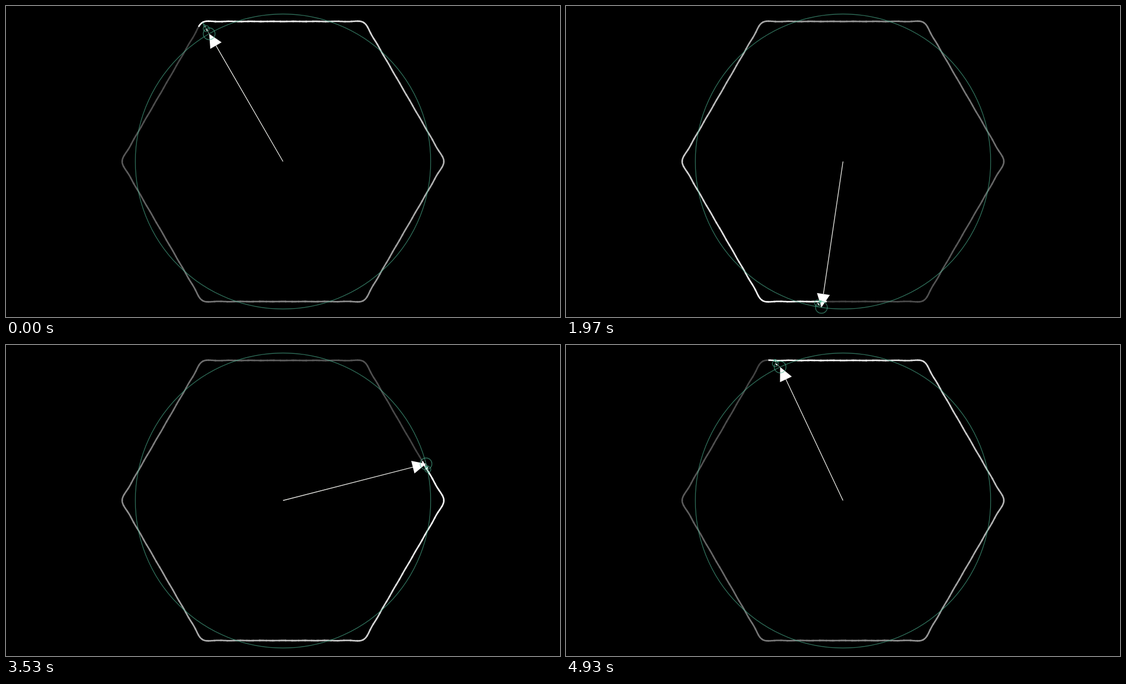
An HTML page with a canvas for the animation above (4.96 s loop, 998 by 561 pixels).

```html
<!DOCTYPE html>
<html lang="en">
<head>
<meta charset="utf-8">
<title>Hexagon from rotating vectors</title>
<style>
  html, body { margin: 0; width: 100%; height: 100%; overflow: hidden; background: #000; }
  canvas { display: block; }
</style>
</head>
<body>
<canvas id="stage" width="998" height="561"></canvas>
<script>
const ctx = document.getElementById('stage').getContext('2d');
const CX = 499, CY = 280.5, RADIUS = 266;
const LOOP = 4960, STEPS = 150, STEP = 2 * Math.PI / STEPS;
const START = 2 * Math.PI / 3;

// A hexagon's Fourier series: frequencies 1 + 6m, amplitudes 1 / n²
const freqs = [1];
for (let k = 1; k <= 7; k++) freqs.push(1 - 6 * k, 1 + 6 * k);

// Joints of the vector chain, from the centre to the pen
function chain(angle) {
  let x = CX, y = CY;
  const points = [[x, y]];
  for (const n of freqs) {
    const r = RADIUS / (n * n);
    x += r * Math.cos(n * angle);
    y -= r * Math.sin(n * angle);
    points.push([x, y]);
  }
  return points;
}

const pen = angle => chain(angle).pop();

// One turn of the outline, sampled finely
const SUB = 6, COUNT = STEPS * SUB;
const outline = Array.from({ length: COUNT }, (_, i) => pen(START + i * STEP / SUB));

function drawTrail(step) {
  const head = (step + 1) * SUB;
  ctx.lineWidth = 2.8;
  ctx.lineJoin = 'round';
  for (let part = 0; part < STEPS; part++) {
    const age = 1 - (part + 0.5) / STEPS;
    const grey = Math.round(255 * (1 - 0.95 * age + 0.2 * age * age));
    const from = part ? part * SUB - 1 : 0;
    ctx.strokeStyle = `rgb(${grey},${grey},${grey})`;
    ctx.beginPath();
    for (let i = from; i <= (part + 1) * SUB; i++) {
      ctx.lineTo(...outline[(head + i) % COUNT]);
    }
    ctx.stroke();
  }
}

function drawArrow([x0, y0], [x1, y1]) {
  const length = Math.hypot(x1 - x0, y1 - y0);
  const ux = (x1 - x0) / length, uy = (y1 - y0) / length;
  const tip = Math.min(24.5, length * 0.35), half = tip * 0.48;
  const bx = x1 - ux * tip, by = y1 - uy * tip;
  ctx.strokeStyle = '#e4e4e0';
  ctx.lineWidth = Math.min(1.4, length * 0.07);
  ctx.beginPath();
  ctx.moveTo(x0, y0);
  ctx.lineTo(bx, by);
  ctx.stroke();
  ctx.fillStyle = '#fff';
  ctx.beginPath();
  ctx.moveTo(x1, y1);
  ctx.lineTo(bx - uy * half, by + ux * half);
  ctx.lineTo(bx + uy * half, by - ux * half);
  ctx.fill();
}

function drawCircle([x, y], r) {
  ctx.strokeStyle = 'rgba(78,178,146,0.6)';
  ctx.lineWidth = Math.min(1.4, 0.4 + r * 0.2);
  ctx.beginPath();
  ctx.arc(x, y, r, 0, 2 * Math.PI);
  ctx.stroke();
}

function draw(time) {
  const t = Math.floor((time % LOOP) / 10) * 10;
  const step = Math.floor((t + 5) * 0.03);
  const joints = chain(START + step * STEP);
  ctx.fillStyle = '#000';
  ctx.fillRect(0, 0, 998, 561);
  drawTrail(step);
  freqs.forEach((n, i) => drawArrow(joints[i], joints[i + 1]));
  freqs.forEach((n, i) => drawCircle(joints[i], RADIUS / (n * n)));
}

const begin = performance.now();
function tick() {
  draw(performance.now() - begin);
  requestAnimationFrame(tick);
}
tick();
</script>
</body>
</html>
```
